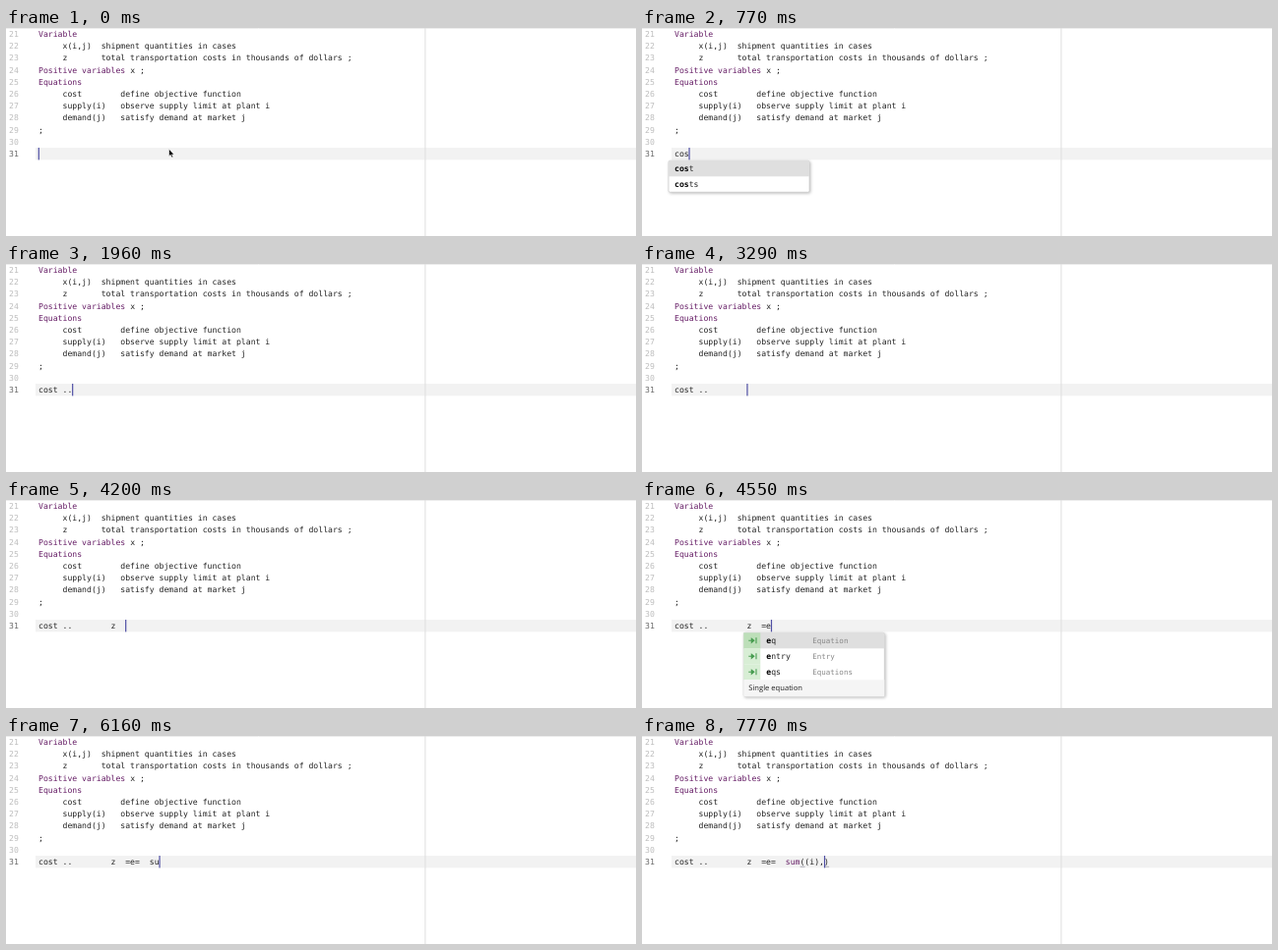
These frames come from a looping animation (640x212 px, 8 s). An HTML page:

```html
<!DOCTYPE html>
<html lang="en">
<head>
<meta charset="utf-8">
<title>Code editor with completion</title>
<style>
html, body { margin: 0; width: 100%; height: 100%; overflow: hidden; background: #fff; }
svg { display: block; width: 640px; height: 212px; }
text { font: 8.155px "DejaVu Sans Mono", monospace; fill: #222; white-space: pre; text-rendering: geometricPrecision; }
.keyword { fill: #651c65; }
.number { fill: #bdbdbd; }
.current { fill: #666; }
.prefix { font-weight: bold; fill: #000; }
.meta { font-size: 7.5px; fill: #888; }
.doc { font: 7.6px "Open Sans", sans-serif; }
.frame { fill: #fff; stroke: #ccc; stroke-width: .7; filter: drop-shadow(1px 1px 1.5px #0004); }
</style>
</head>
<body>
<svg viewBox="0 0 640 212">
  <path d="M0 .5H640" stroke="#eee"/>
  <rect x="30" y="122" width="610" height="12.4" fill="#f2f2f2"/>
  <rect x="425.4" width="1" height="212" fill="#dedede"/>
  <g id="code"></g>
  <g id="live"></g>
</svg>
<script>
const LOOP = 8000, LEFT = 33, CHAR = 4.91, LINE = 12.2, BASE = 9;
const EDIT_ROW = 10, EDIT_TOP = 122;
const lines = [
  'Variable',
  '     x(i,j)  shipment quantities in cases',
  '     z       total transportation costs in thousands of dollars ;',
  'Positive variables x ;',
  'Equations',
  '     cost        define objective function',
  '     supply(i)   observe supply limit at plant i',
  '     demand(j)   satisfy demand at market j',
  ';', '', ''
];

const columnX = col => LEFT + col * CHAR;
const text = (x, y, content, cls = '') => `<text x="${x}" y="${y}" class="${cls}">${content}</text>`;
const rect = (x, y, w, h, fill) => `<rect x="${x}" y="${y}" width="${w}" height="${h}" fill="${fill}"/>`;
const highlight = line => line.replace(/^(Variable|Positive variables|Equations)|\bsum\b/g,
  '<tspan class="keyword">$&</tspan>');
const codeLine = (row, line) => text(LEFT, row * LINE + BASE, highlight(line));

const wordList = { col: 0, items: [['cost'], ['costs']] };
const lastWord = { col: 0, items: [['costs']] };
const equationList = { col: 19, doc: 'Single equation',
  items: [['eq', 'Equation'], ['entry', 'Entry'], ['eqs', 'Equations']] };
const sumList = { col: 23, doc: 'Sum over set',
  items: [['sum', 'Sum'], ['supply', 'Supply'], ['sums', 'Sums']] };

// Each step: start time, text on the edited line, and optional details.
const start = 'cost ..';
const objective = start + ' '.repeat(8) + 'z';
const equals = objective + '  =e=';
const steps = [
  [0, '', { pointer: true }],
  [350, 'c'],
  [560, 'co'],
  [700, 'cos'],
  [770, 'cos', { popup: wordList, prefix: 3 }],
  [1050, 'cost', { popup: lastWord, prefix: 4 }],
  [1260, 'cost', { popup: lastWord, prefix: 4, caret: false }],
  [1540, 'cost '],
  [1820, 'cost .'],
  [1960, start],
  ...[2100, 2240, 2310, 2450, 2520, 2590, 2730, 3080].map((t, i) => [t, start + ' '.repeat(i + 1)]),
  [3500, objective],
  [3570, objective + ' '],
  [3850, objective + ' ', { caret: false }],
  [4200, objective + '  '],
  [4410, objective + '  ='],
  [4550, objective + '  =e', { popup: equationList, prefix: 1 }],
  [4760, equals],
  [5040, equals + ' '],
  [5250, equals + '  '],
  [5880, equals + '  s'],
  [6160, equals + '  su'],
  [6300, equals + '  su', { popup: sumList, prefix: 2 }],
  [6510, equals + '  sum'],
  [6860, equals + '  sum()', { col: 27, pair: [26, 27] }],
  [7140, equals + '  sum(())', { col: 28, pair: [27, 28] }],
  [7280, equals + '  sum((i))', { col: 29, pair: [27, 29] }],
  [7490, equals + '  sum((i))', { col: 30, pair: [27, 29] }],
  [7630, equals + '  sum((i),)', { col: 31, pair: [26, 31] }]
];

function drawPopup({ col, items, doc }, prefix) {
  const top = 135.3, rowHeight = 16, width = 143;
  const textX = columnX(col), x = textX - (doc ? 23 : 6);
  const height = items.length * rowHeight + (doc ? 17 : 0);
  let out = `<rect class="frame" x="${x}" y="${top}" width="${width}" height="${height}" rx="1.5"/>`;
  items.forEach(([word, meta], i) => {
    const y = top + i * rowHeight;
    if (!i) out += rect(x, y, width, rowHeight, '#dfdfdf');
    if (doc) {
      out += rect(x, y, 17, rowHeight, i ? '#d8eed5' : '#bddfb9');
      out += `<path transform="translate(${x + 5} ${y + 8})" d="M0 0H5M3 -2L5.5 0L3 2ZM7.7 -3V3" fill="#479c50" stroke="#479c50" stroke-width="1.1"/>`;
      out += text(textX + 47, y + 10.5, meta, 'meta');
    }
    out += text(textX, y + 10.7,
      `<tspan class="prefix">${word.slice(0, prefix)}</tspan>${word.slice(prefix)}`);
  });
  if (doc) {
    const y = top + items.length * rowHeight;
    out += rect(x, y, width, 17, '#f5f5f5') + text(x + 5, y + 11, doc, 'doc');
  }
  return out;
}

function drawStep([, line, { col = line.length, caret = true, pair = [], popup, prefix, pointer } = {}]) {
  let out = codeLine(EDIT_ROW, line);
  for (const c of pair) out += rect(columnX(c), 132.8, CHAR, .8, '#9a9aa8');
  if (caret) out += rect(columnX(col) - .3, EDIT_TOP, 1.2, 12.4, '#5050a5');
  if (popup) out += drawPopup(popup, prefix);
  if (pointer) out += '<path d="M165.5 123.3V130.8L167.2 129.3L168.4 132L169.7 131.4L168.6 128.9H170.8Z" fill="#000" stroke="#fff" stroke-width=".6"/>';
  return out;
}

document.getElementById('code').innerHTML = lines.map((line, row) =>
  text(3, row * LINE + BASE, 21 + row, row === EDIT_ROW ? 'current' : 'number') + codeLine(row, line)).join('');

const live = document.getElementById('live');
const origin = performance.now();
let shown;
function render() {
  const time = (performance.now() - origin) % LOOP;
  const step = steps.findLast(([at]) => at <= time);
  if (step !== shown) live.innerHTML = drawStep(shown = step);
  requestAnimationFrame(render);
}
render();
</script>
</body>
</html>
```
